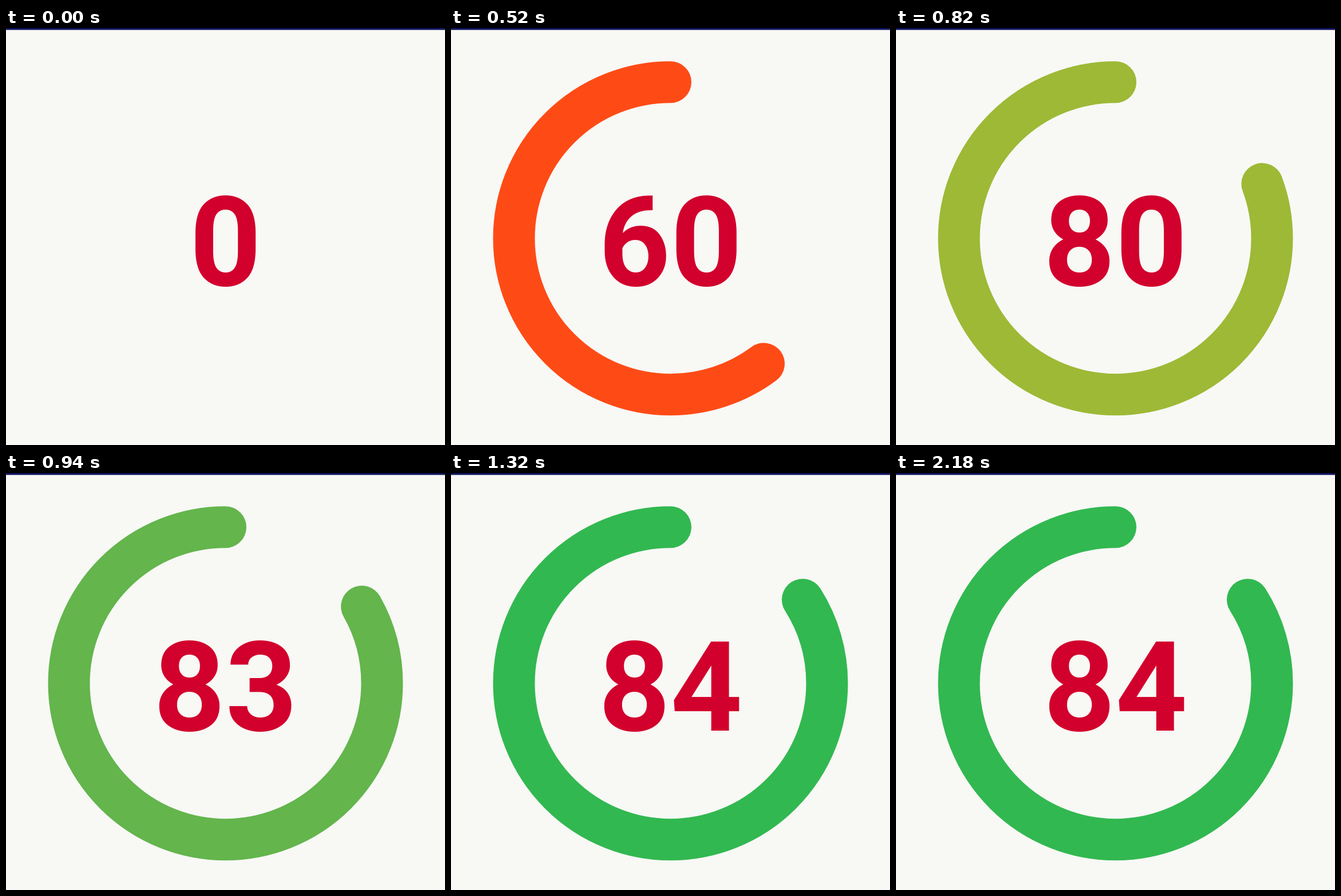
Recreate the animation shown at these times as an HTML page with a canvas. Size 767 px wide and 730 px high, loop 2200 ms.

```html
<!DOCTYPE html>
<html lang="en">
<head>
<meta charset="utf-8">
<title>Score ring</title>
<style>
  html, body { margin: 0; width: 100%; height: 100%; overflow: hidden; background: #f8f8f5; }
  canvas { display: block; }
</style>
</head>
<body>
<canvas id="stage" width="767" height="730"></canvas>
<script>
const ctx = document.getElementById('stage').getContext('2d');
const W = 767, H = 730, CX = 383.5, CY = 368.2, RADIUS = 273.5;
const LOOP = 2200, DELAY = 55.6, DURATION = 1017, SCORE = 84;

// score -> ring colour
const STOPS = [
  [0, 255, 13, 13],
  [40, 255, 13, 13],
  [60, 254, 74, 22],
  [68, 255, 142, 15],
  [75.7, 255, 200, 0],
  [80, 172, 186, 48],
  [83.2, 99, 181, 76],
  [84, 50, 184, 80]
];

const bezier = (a, b, s) => 3 * (1 - s) * (1 - s) * s * a + 3 * (1 - s) * s * s * b + s * s * s;

// cubic-bezier(.4, 0, .2, 1)
function ease(x) {
  if (x <= 0) return 0;
  if (x >= 1) return 1;
  let lo = 0, hi = 1;
  for (let i = 0; i < 24; i++) {
    const mid = (lo + hi) / 2;
    if (bezier(0.4, 0.2, mid) < x) lo = mid; else hi = mid;
  }
  return bezier(0, 1, lo);
}

function ringColor(value) {
  let i = 1;
  while (i < STOPS.length - 1 && value > STOPS[i][0]) i++;
  const a = STOPS[i - 1], b = STOPS[i];
  const k = Math.min(1, (value - a[0]) / (b[0] - a[0]));
  const rgb = [1, 2, 3].map(c => Math.round(a[c] + (b[c] - a[c]) * k));
  return `rgb(${rgb})`;
}

function drawRing(value) {
  const start = -Math.PI / 2;
  ctx.beginPath();
  ctx.arc(CX, CY, RADIUS, start, start - value / 100 * 2 * Math.PI, true);
  ctx.lineWidth = 73;
  ctx.lineCap = 'round';
  ctx.strokeStyle = ringColor(value);
  ctx.stroke();
}

function draw(time) {
  const value = SCORE * ease((time - DELAY) / DURATION);
  ctx.fillStyle = '#f8f8f5';
  ctx.fillRect(0, 0, W, H);
  ctx.fillStyle = '#10145c';
  ctx.fillRect(0, 0, W, 3.4);
  if (value > 0) drawRing(value);
  ctx.fillStyle = '#d2002c';
  ctx.font = '700 219px Roboto, sans-serif';
  ctx.textAlign = 'center';
  ctx.textBaseline = 'alphabetic';
  ctx.fillText(Math.floor(value + 1e-6), CX, 450.6);
}

const origin = performance.now();
function tick() {
  draw((performance.now() - origin) % LOOP);
  requestAnimationFrame(tick);
}
tick();
</script>
</body>
</html>
```
